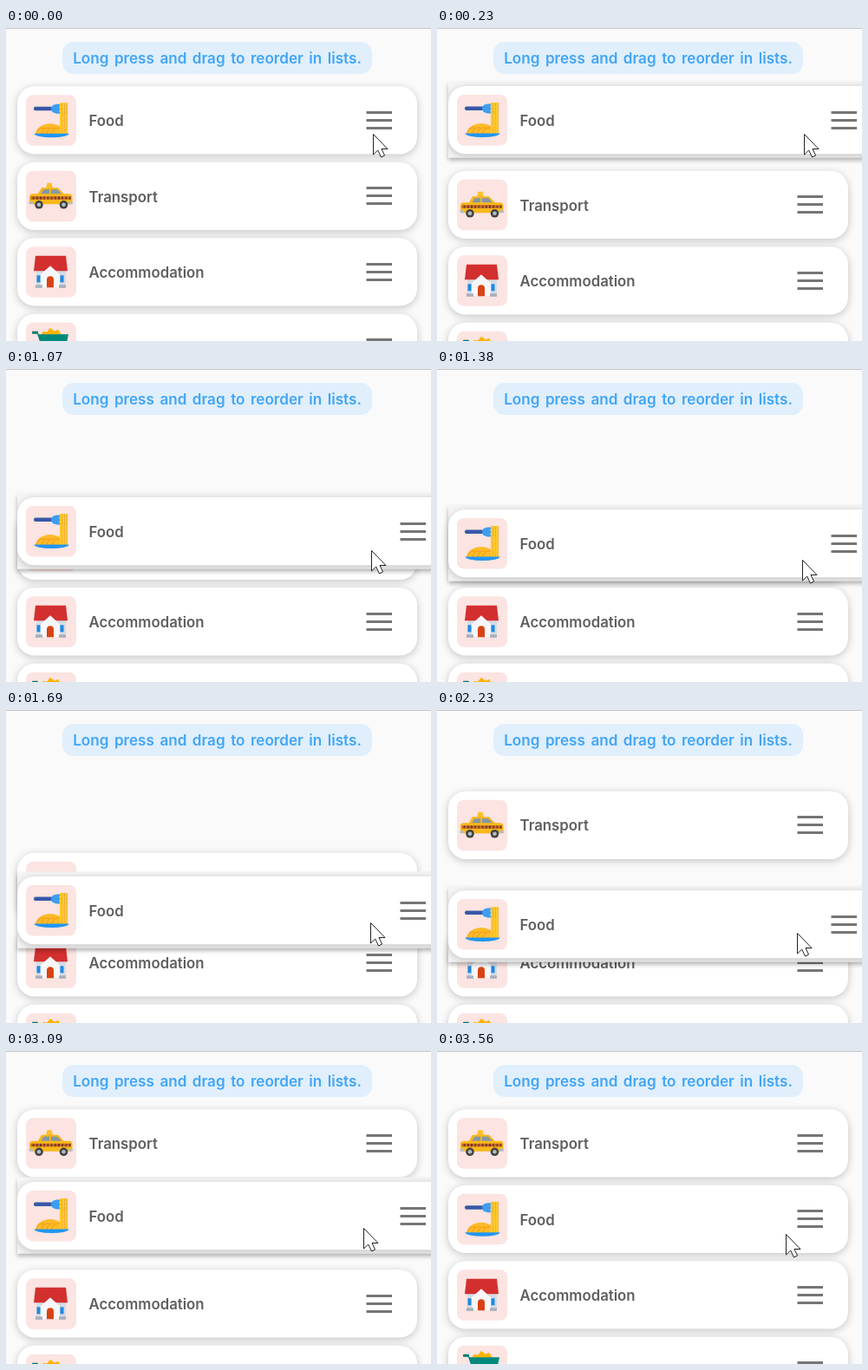
An HTML page with a canvas that plays this animation: 490 px wide and 361 px high, repeating every 3.64 s.

```html
<!DOCTYPE html>
<html lang="en">
<head>
<meta charset="utf-8">
<title>Reorder list</title>
<style>
html, body { margin: 0; width: 490px; height: 361px; overflow: hidden; background: #fafafa; }
canvas { display: block; }
</style>
</head>
<body>
<canvas id="stage" width="490" height="361"></canvas>
<script>
const ctx = document.getElementById('stage').getContext('2d');
const LOOP = 3640, PITCH = 87.5, FIRST_TOP = 67.3, CARD_H = 78.2, GAP = 10;

// Each move runs in equal steps and ends with the pointer at x, y and the dragged card at top
const lift = { start: 80, end: 230, steps: 3, x: 423, y: 122, top: 67 };
const dragDown = { start: 610, end: 1070, steps: 7, x: 421, y: 209, top: 148 };
const creep = { start: 1150, end: 1690, steps: 8, x: 420, y: 245, top: 191.5 };
const turn = { start: 2070, end: 2550, steps: 7, x: 407, y: 247, top: 204, dip: 12 };
const dragUp = { start: 2630, end: 3090, steps: 7, x: 412, y: 204, top: 151 };
const drop = { start: 3160, end: 3330, steps: 3, x: 404, y: 209, top: 151 };
const settle = { start: 3560, end: 3640, steps: 1, x: 402, y: 211, top: 151 };
const moves = [lift, dragDown, creep, turn, dragUp, drop, settle];

function progress(move, t) {
  if (t < move.start) return 0;
  const interval = (move.end - move.start) / Math.max(1, move.steps - 1);
  const step = Math.floor((t - move.start) / interval + 1e-6) + 1;
  return Math.min(1, step / move.steps);
}

const smooth = p => p * p * (3 - 2 * p);

function pose(t) {
  let { x, y, top } = lift;
  for (const move of moves) {
    const p = progress(move, t), e = smooth(p);
    const dip = (move.dip || 0) * Math.sin(Math.PI * p);
    x += (move.x - x) * e;
    y += (move.y - y) * e + dip;
    top += (move.top - top) * e + dip;
  }
  return { x, y, top };
}

function rect(color, x, y, w, h, r = 0) {
  ctx.fillStyle = color;
  ctx.beginPath();
  ctx.roundRect(x, y, w, h, r);
  ctx.fill();
}

function poly(color, ...points) {
  ctx.fillStyle = color;
  ctx.beginPath();
  for (const [x, y] of points) ctx.lineTo(x, y);
  ctx.closePath();
  ctx.fill();
}

function disc(color, x, y, rx, ry = rx, from = 0, to = Math.PI * 2) {
  ctx.fillStyle = color;
  ctx.beginPath();
  ctx.ellipse(x, y, rx, ry, 0, from, to);
  ctx.fill();
}

function shadow(alpha, blur, dy) {
  ctx.shadowColor = `rgba(0,0,0,${alpha})`;
  ctx.shadowBlur = blur;
  ctx.shadowOffsetY = dy;
}

// Icons are drawn inside a 58px tile
function drawFood() {
  rect('#3858a8', 9, 13.5, 22, 4.5, 2);
  disc('#3d9df0', 34, 16, 5, 5);
  for (let i = 0; i < 3; i++) rect('#3d9df0', 34, 10.5 + i * 4.2, 14, 2.6, 1);
  disc('#fdbb2b', 28, 45, 16.5, 12, Math.PI, 0);
  ctx.strokeStyle = '#f39a0b';
  ctx.lineWidth = 1;
  for (let i = 0; i < 4; i++) {
    ctx.beginPath();
    ctx.arc(19 + i * 6, 45, 7, Math.PI, Math.PI * 1.6);
    ctx.stroke();
  }
  for (let i = 0; i < 3; i++) {
    rect('#ffca28', 39 + i * 3, 9, 2.3, 36);
    rect('#f9a825', 41 + i * 3, 9, 0.8, 36);
  }
  disc('#2196f3', 29.5, 44.5, 20, 4.5, 0, Math.PI);
}

function drawTaxi() {
  poly('#fbc02d', [24.5, 14], [29.5, 14], [31, 20], [23, 20]);
  poly('#f5b51b', [13, 28], [18, 19.5], [37, 19.5], [45, 28]);
  poly('#8398a5', [17, 27], [20.5, 21.5], [27, 21.5], [27, 27]);
  poly('#8398a5', [29, 27], [29, 21.5], [36, 21.5], [41.5, 27]);
  rect('#f9b81a', 4, 26.5, 49.5, 12, 4);
  for (let i = 0; i < 22; i++) {
    rect(i % 2 ? '#7b3326' : '#c0672c', 5.5 + i * 2.1, 29.5, 2.1, 3.5);
  }
  rect('#b0bec5', 3.5, 35.5, 5, 3, 1);
  rect('#b0bec5', 49, 35.5, 5, 3, 1);
  for (const x of [15, 43.5]) {
    disc('#424242', x, 39, 4.8);
    disc('#b0bec5', x, 39, 2.3);
  }
}

function drawHouse() {
  rect('#d5dbe4', 12, 27, 34, 20);
  poly('#d32f2f', [11, 10.5], [46, 10.5], [48, 28], [9, 28]);
  poly('#f7f7f9', [17, 47], [17, 32], [28, 22], [39, 32], [39, 47]);
  rect('#d84315', 24, 34, 8, 13, [4, 4, 0, 0]);
  for (const x of [12.5, 39.5]) {
    rect('#1e88e5', x, 33, 4, 8);
    rect('#a9afbb', x - 1.5, 44, 8, 3.5);
  }
}

function drawCart() {
  poly('#ffb300', [17, 14], [20, 10], [24, 11], [28, 6], [33, 10], [37, 8], [41, 14]);
  rect('#00796b', 7, 10, 7, 3, 1);
  poly('#00897b', [12, 10], [15, 13.5], [49, 13.5], [46, 28], [18, 28]);
  rect('#00796b', 18, 29, 28, 3);
  for (const x of [22, 42]) disc('#455a64', x, 38, 4);
}

const food = { label: 'Food', icon: drawFood };
const transport = { label: 'Transport', icon: drawTaxi };
const lodging = { label: 'Accommodation', icon: drawHouse };
const shopping = { label: 'Shopping', icon: drawCart };

function drawCard(item, top, stretch = 0) {
  ctx.save();
  shadow(0.22, 10, 2);
  rect('#fff', 13, top, 461 + stretch, CARD_H, 20);
  ctx.restore();

  ctx.save();
  ctx.translate(23, top + 10);
  rect('#fbe4e1', 0, 0, 58, 58.5, 8);
  item.icon();
  ctx.restore();

  ctx.font = '600 16.8px Inter, sans-serif';
  ctx.fillStyle = '#5f5f5f';
  ctx.fillText(item.label, 95.5, top + 45.7);
  for (let i = -1; i <= 1; i++) {
    rect('#757575', 415.5 + stretch, Math.round(top + 37.5) + i * 9, 29.5, 3);
  }
}

function drawDragged(top) {
  const frame = [13, top - 5.5, 500, CARD_H + 10];
  ctx.save();
  shadow(0.3, 5, 3);
  rect('#f5f5f5', ...frame);
  ctx.restore();
  ctx.save();
  ctx.beginPath();
  ctx.rect(...frame);
  ctx.clip();
  drawCard(food, top, 39);
  ctx.restore();
}

function drawHeader() {
  rect('#c4c4c4', 0, 0, 490, 1);
  rect('#e0effb', 65, 16, 357, 37, 13);
  ctx.font = '600 17.1px Inter, sans-serif';
  ctx.fillStyle = '#42a5f5';
  ctx.textAlign = 'center';
  ctx.wordSpacing = '2.2px';
  ctx.fillText('Long press and drag to reorder in lists.', 243.5, 41.4);
  ctx.textAlign = 'left';
  ctx.wordSpacing = '0px';
}

function drawCursor(x, y) {
  ctx.save();
  ctx.translate(Math.round(x) + 0.5, Math.round(y) + 0.5);
  poly('#fff', [0, 0], [0, 23.5], [5.2, 18.5], [9, 26.5], [13, 24.5], [9.5, 17], [16.5, 17]);
  ctx.strokeStyle = '#222';
  ctx.lineWidth = 1;
  ctx.stroke();
  ctx.restore();
}

function render(t) {
  const { x, y, top } = pose(t);
  const grow = GAP * (smooth(progress(lift, t)) - smooth(progress(drop, t)));
  const swap = Math.min(1, progress(turn, t) * 1.7);
  const row = i => FIRST_TOP + PITCH * i;

  rect('#fafafa', 0, 0, 490, 361);
  drawHeader();
  drawCard(transport, row(1) + grow - (PITCH + grow) * swap);
  drawCard(lodging, row(2) + grow);
  drawCard(shopping, row(3) + grow);
  if (t < lift.start) drawCard(food, row(0));
  else if (t < drop.start) drawDragged(Math.round(top));
  else drawCard(food, row(1));
  drawCursor(x, y);
}

const start = performance.now();
function loop() {
  render((performance.now() - start) % LOOP);
  requestAnimationFrame(loop);
}
loop();
</script>
</body>
</html>
```
